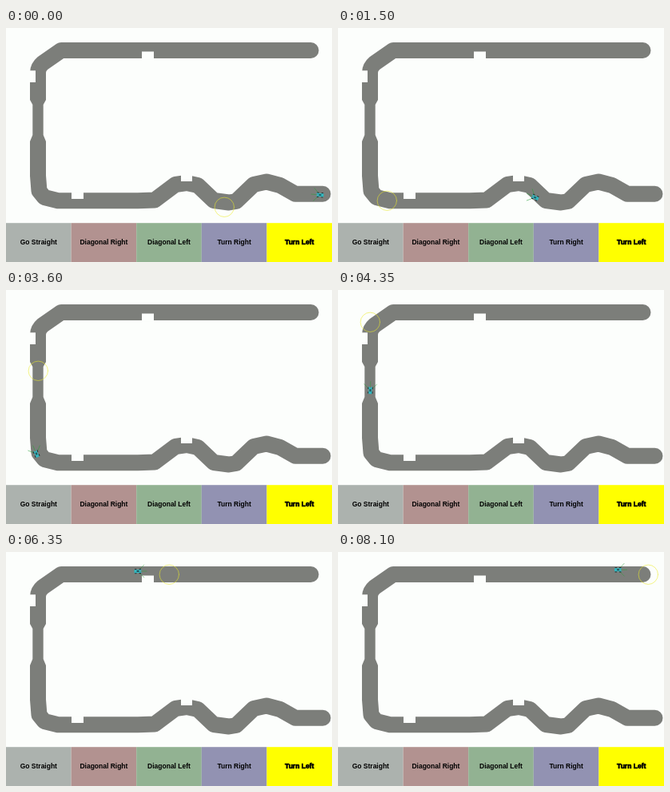
Write an HTML page with a canvas that moves like this. It is 408 px wide and 293 px high and loops after 8.15 s.

```html
<!DOCTYPE html>
<html>
<head>
<meta charset="utf-8">
<style>
html, body { margin: 0; width: 100%; height: 100%; overflow: hidden; background: #fcfefc; }
canvas { display: block; }
</style>
</head>
<body>
<canvas id="stage" width="408" height="293"></canvas>
<script>
const ctx = document.getElementById('stage').getContext('2d');
const LOOP = 8150, STEP = 50, SPEED = 0.106, REACH = 38;
const PAPER = '#fcfefc', ROAD = '#7c7e7a';

const road = new Path2D(`M381.5 28H69L46 44Q40 49 40 56V82
  M40 150V185L41.5 204L48 212L65 216.3H165L186 215.5
  L212 196L226 194L240 197L260 216L279 218.5L288 217
  L310 196L326 192.5L343 197L362 207.7H396.5`);
const neck = new Path2D('M30 82V90L33.3 96V134L30 142V150H50V142L46.7 134V96L50 90V82Z');
const obstacles = [[170, 29.5, 15, 10], [82, 205.5, 15, 8.5], [219, 182, 14, 10], [28, 53.3, 9, 14.7]];

const route = document.createElementNS('http://www.w3.org/2000/svg', 'path');
route.setAttribute('d', `M393 209L358 206L326 190L294 211L279 218H265L246 212L228 199
  L208 203L194 214L170 220L129 222L51 217L38 205L43 42L53 30L72 25L382 22`);

const goals = [[273, 224], [61, 216], [40, 101], [40, 40], [204, 28], [388, 28]];
const buttons = [
  ['Go Straight', '#acb2ae', '#ffffff'],
  ['Diagonal Right', '#b29290', '#ff0000'],
  ['Diagonal Left', '#92b292', '#00ff00'],
  ['Turn Right', '#9292b2', '#0000ff'],
  ['Turn Left', '#b2b292', '#ffff00']
];

function position(t) {
  const p = route.getPointAtLength(Math.max(0, t * SPEED));
  return [p.x, p.y];
}

function heading(t) {
  const [x0, y0] = position(t - 70);
  const [x1, y1] = position(t + 70);
  return Math.atan2(y1 - y0, x1 - x0);
}

// The next goal appears once the car comes within reach of the current one.
const goalAt = [];
for (let t = 0, goal = 0; t < LOOP; t += STEP) {
  const [x, y] = position(t);
  const [gx, gy] = goals[goal];
  if (Math.hypot(gx - x, gy - y) < REACH && goal < goals.length - 1) goal++;
  goalAt.push(goals[goal]);
}

function action(t) {
  const i = t / STEP;
  const turn = heading(t + 100) - heading(t - 100);
  if (i % 17 === 5) return 0;
  return Math.sin(turn) > 0.3 && i % 3 === 1 ? 3 : 4;
}

function rect(color, ...box) {
  ctx.fillStyle = color;
  ctx.fillRect(...box);
}

function drawTrack() {
  rect(PAPER, 0, 0, 408, 293);
  ctx.strokeStyle = ctx.fillStyle = ROAD;
  ctx.lineWidth = 20;
  ctx.lineJoin = ctx.lineCap = 'round';
  // keep the round caps out of the narrow stretch
  ctx.save();
  ctx.beginPath();
  ctx.rect(0, 0, 408, 82);
  ctx.rect(0, 150, 408, 94);
  ctx.clip();
  ctx.stroke(road);
  ctx.restore();
  ctx.fill(neck);
  obstacles.forEach(box => rect(PAPER, ...box));
}

function drawCar(t) {
  ctx.save();
  ctx.translate(...position(t));
  ctx.rotate(heading(t));
  ctx.strokeStyle = '#28a038';
  ctx.lineWidth = 0.5;
  ctx.beginPath();
  for (const angle of [-0.8, 0, 0.8]) {
    ctx.moveTo(0, 0);
    ctx.lineTo(11 * Math.cos(angle), 11 * Math.sin(angle));
  }
  ctx.stroke();
  for (const x of [-4, 1.5])
    for (const y of [-3.2, 2]) rect('#203030', x, y, 2.4, 1.2);
  rect('#30b8c0', -4.5, -2, 9, 4);
  rect('#285058', -1.5, -1, 3, 2);
  rect('#c04038', 3.4, -0.5, 1, 1);
  ctx.restore();
}

function drawGoal(t) {
  const [x, y] = goalAt[t / STEP];
  ctx.strokeStyle = 'rgba(235, 235, 40, 0.8)';
  ctx.lineWidth = 0.7;
  ctx.beginPath();
  ctx.arc(x + 0.3, y + 0.3, 12.2, 0, 7);
  ctx.stroke();
}

function drawButtons(active) {
  const width = 408 / buttons.length;
  ctx.font = 'bold 8.5px "Liberation Sans", Arial, sans-serif';
  ctx.textAlign = 'center';
  ctx.textBaseline = 'middle';
  buttons.forEach(([label, dim, lit], i) => {
    const center = (i + 0.5) * width;
    rect(i === active ? lit : dim, i * width, 244.2, width, 49);
    ctx.fillStyle = ctx.strokeStyle = '#000';
    ctx.fillText(label, center, 268.5);
    if (i === active) {
      ctx.lineWidth = 0.7;
      ctx.strokeText(label, center, 268.5);
    }
  });
}

function frame(now) {
  const t = Math.floor((now % LOOP) / STEP) * STEP;
  drawTrack();
  drawCar(t);
  drawGoal(t);
  drawButtons(action(t));
  requestAnimationFrame(frame);
}
frame(0);
</script>
</body>
</html>
```
